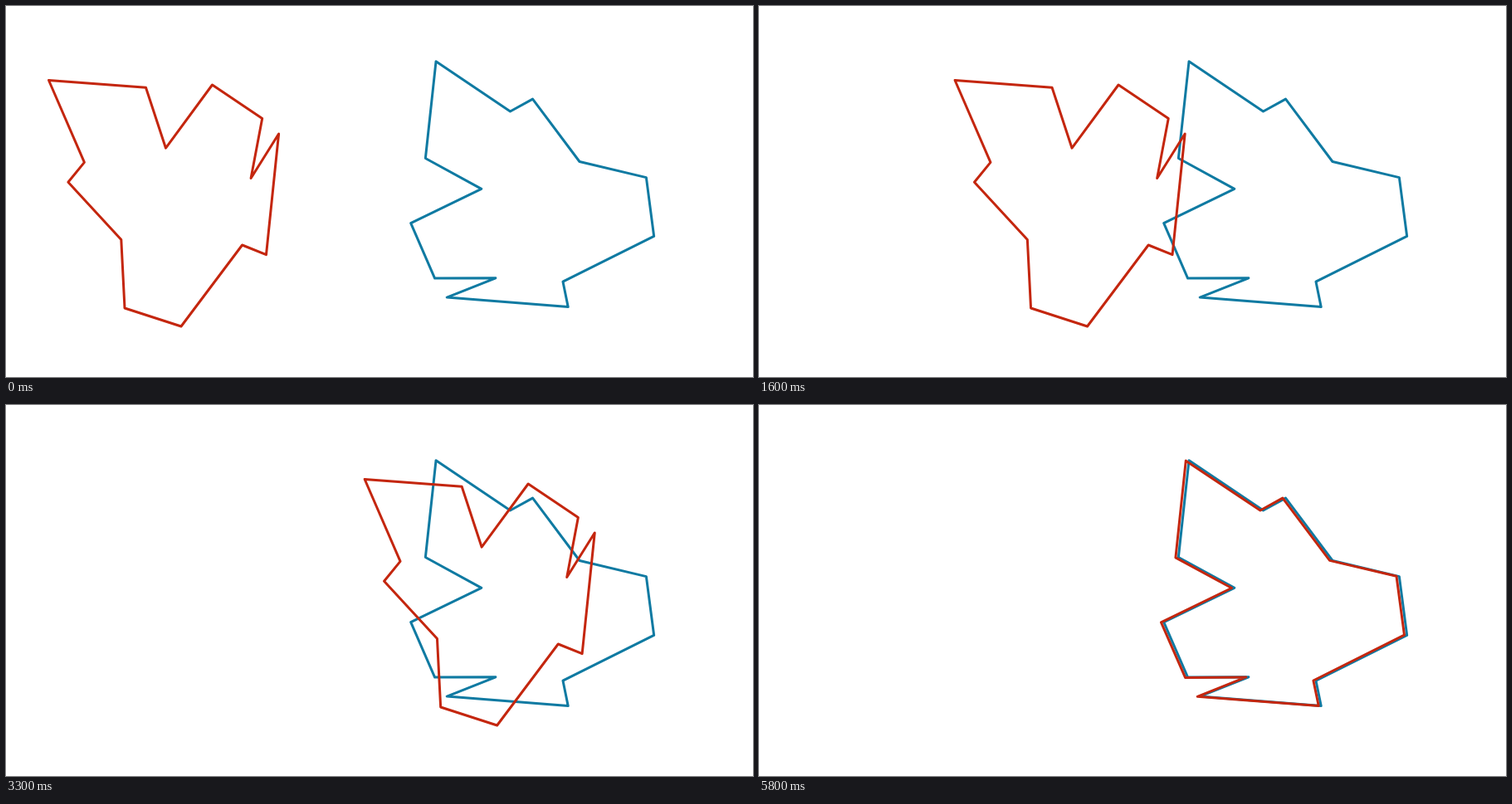
An HTML page with a canvas that plays this animation: 900x447 px, repeating every 6.4 s.

```html
<!DOCTYPE html>
<html lang="en">
<head>
<meta charset="utf-8">
<title>Congruent polygons</title>
<style>
  html, body { margin: 0; width: 100%; height: 100%; overflow: hidden; background: #fff; }
  canvas { display: block; width: 900px; height: 447px; }
</style>
</head>
<body>
<canvas id="stage" width="900" height="447"></canvas>
<script>
const ctx = document.getElementById('stage').getContext('2d');
const LOOP = 6400, STEP = 100;
const FLIP_AT = 4400, TURN_AT = 5000;
const RED = '#c4260e', BLUE = '#0f7aa2';
const SHIFT = 436, SLIDE = 11.535;
const TURN = 79.7, SPIN = 9.13, LEAD = 10;
const pivot = { x: 631.25, y: 234.5 };

// corners of the shape in its starting place
const corners = [
  [51.5, 89.5], [168.5, 98.2], [192.5, 171.2], [248.5, 95], [308.7, 135.5],
  [295.1, 207.5], [328.6, 154], [313.5, 299.7], [284.6, 288], [211, 386],
  [143, 364], [138.8, 281.5], [74.9, 212.3], [94.4, 188.4]
];

// the congruent copy: mirrored, turned and set slightly to the right
const copy = { dx: SHIFT, flip: -1, angle: 79.55, gap: 3.3 };

// slide right, mirror about the pivot, then turn counterclockwise
function pose(ms) {
  const t = Math.floor(ms / STEP) * STEP;
  return {
    dx: Math.min(SHIFT, SLIDE * t / STEP),
    flip: t < FLIP_AT ? 1 : -1,
    angle: t < TURN_AT ? 0 : Math.min(TURN, LEAD + SPIN * (t - TURN_AT) / STEP),
    gap: 0
  };
}

function drawShape({ dx, flip, angle, gap }, color) {
  const a = -angle * Math.PI / 180, c = Math.cos(a), s = Math.sin(a);
  ctx.beginPath();
  for (const [px, py] of corners) {
    const x = flip * (px + dx - pivot.x), y = py - pivot.y;
    ctx.lineTo(pivot.x + gap + x * c - y * s, pivot.y + x * s + y * c);
  }
  ctx.closePath();
  ctx.strokeStyle = color;
  ctx.stroke();
}

function draw(ms) {
  ctx.fillStyle = '#fff';
  ctx.fillRect(0, 0, 900, 447);
  ctx.lineWidth = 3;
  ctx.lineJoin = 'round';
  drawShape(copy, BLUE);
  drawShape(pose(ms), RED);
}

const start = performance.now();
function tick() {
  draw((performance.now() - start) % LOOP);
  requestAnimationFrame(tick);
}
tick();
</script>
</body>
</html>
```
